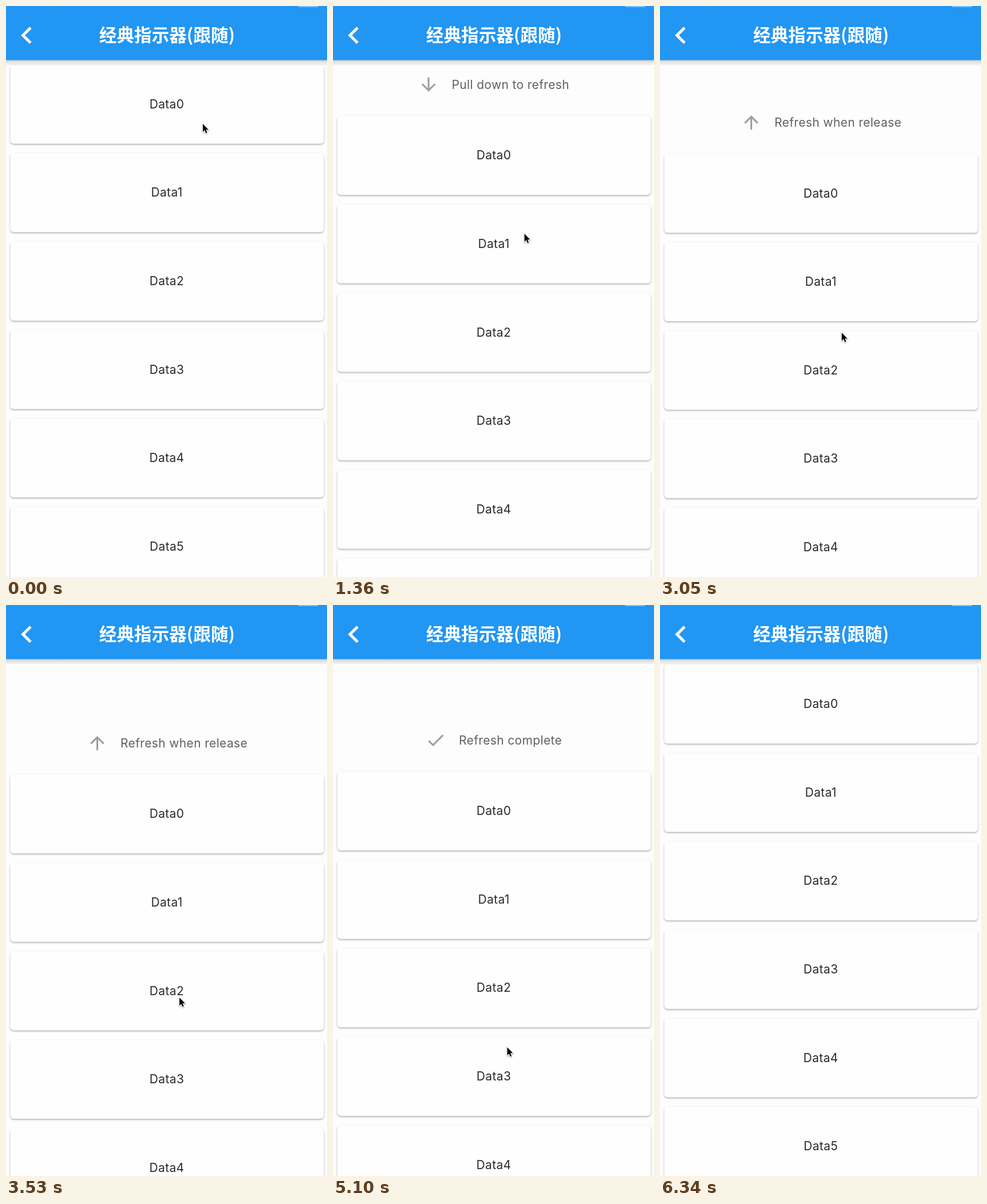
Recreate the animation shown at these times as an HTML page with a canvas. Size 561x998 px, loop 6.44 s.

```html
<!DOCTYPE html>
<html lang="zh">
<head>
<meta charset="utf-8">
<title>Pull to refresh</title>
<style>
  html, body { margin: 0; width: 100%; height: 100%; overflow: hidden; background: #fdfdfd; }
  canvas { display: block; width: 561px; height: 998px; }
</style>
</head>
<body>
<canvas id="stage" width="561" height="998"></canvas>
<script>
const ctx = document.getElementById('stage').getContext('2d');
const W = 561, H = 998, LOOP = 6440, BAR = 94;
const BLUE = '#2196f3', GRAY = '#9e9e9e';
const RELEASE_1 = 3965, SPIN_START = 4017, GRAB_2 = 4640, DONE = 4930, RELEASE_2 = 5734;
const HEADER_H = 93, TRIGGER = 150, REACH_1 = 524, REACH_2 = 206;

const icons = {
  arrow: new Path2D('M20 12l-1.41-1.41L13 16.17V4h-2v12.17l-5.58-5.59L4 12l8 8 8-8z'),
  check: new Path2D('M9 16.17L4.83 12l-1.42 1.41L9 19 21 7l-1.41-1.41z'),
  back: new Path2D('M11.67 3.87L9.9 2.1 0 12l9.9 9.9 1.77-1.77L3.54 12z'),
  pointer: new Path2D('M0 0V14L3.2 11.1 5.4 16.2 7.6 15.2 5.4 10.2H9.8z')
};

const ramp = (t, from, to) => Math.min(1, Math.max(0, (t - from) / (to - from)));
const mix = (a, b, k) => a + (b - a) * k;

// How far the list follows a finger that has moved d
const rubber = d => 480 * (1 - Math.exp(-d / 930));

// Overdamped scroll spring, from 1 to 0
function spring(ms) {
  const s = ms / 1000;
  return 1.7 * Math.exp(-9.07 * s) - 0.7 * Math.exp(-22 * s);
}

// Four strokes with short rests between them
const drag1 = t => 192 * ramp(t, 270, 1360) + 124 * ramp(t, 1600, 2280)
  + 49 * ramp(t, 2520, 3050) + 159 * ramp(t, 3140, 3680);

const drag2 = t => REACH_2 * ramp(t, GRAB_2, 5100) + 60 * ramp(t, 5100, 5700);

function offsetAt(t) {
  if (t < RELEASE_1) return rubber(drag1(t));
  if (t < GRAB_2) return mix(HEADER_H, rubber(REACH_1), spring(t - RELEASE_1));
  const pulled = HEADER_H + rubber(drag2(t));
  return t < RELEASE_2 ? pulled : pulled * spring(t - RELEASE_2);
}

function pointerAt(t) {
  if (t < GRAB_2) {
    const d = drag1(t), back = ramp(t, 4230, 4600);
    const x = 344 - 47 * (d / REACH_1) ** 1.6;
    return [mix(x, 329, back), mix(206 + d, 567, back)];
  }
  const d = drag2(t);
  return [329 - 24.5 * d / REACH_2, 567 + d];
}

let armedAt = 0;
while (offsetAt(armedAt) < TRIGGER) armedAt += 10;
armedAt = Math.min(armedAt, 2840);

// Cubic curve (0.4, 0, 0.2, 1)
function fastOutSlowIn(x) {
  if (x <= 0) return 0;
  if (x >= 1) return 1;
  let lo = 0, hi = 1;
  for (let i = 0; i < 20; i++) {
    const m = (lo + hi) / 2, n = 1 - m;
    if (1.2 * n * n * m + 0.6 * n * m * m + m * m * m < x) lo = m; else hi = m;
  }
  return lo * lo * (3 - 2 * lo);
}

function icon(path, x, y, scale, color, turn = 0, bold = 0) {
  ctx.save();
  ctx.translate(x, y);
  ctx.rotate(turn);
  ctx.scale(scale, scale);
  ctx.translate(-12, -12);
  ctx.fillStyle = ctx.strokeStyle = color;
  ctx.fill(path);
  if (bold) {
    ctx.lineWidth = bold;
    ctx.stroke(path);
  }
  ctx.restore();
}

function label(str, x, y, color, align) {
  ctx.font = '400 21px Inter, Roboto, sans-serif';
  ctx.letterSpacing = '0.35px';
  ctx.textAlign = align;
  ctx.fillStyle = color;
  ctx.fillText(str, x, y);
}

function spinner(x, y, t) {
  const cycles = Math.max(0, t - SPIN_START) / 1000;
  const step = Math.floor(cycles), u = cycles - step;
  const head = fastOutSlowIn(u * 2), tail = fastOutSlowIn(u * 2 - 1);
  const start = Math.PI * (-0.5 + 1.5 * tail + 1.7 * u - 0.8 * step);
  ctx.strokeStyle = BLUE;
  ctx.lineWidth = 3;
  ctx.beginPath();
  ctx.arc(x, y, 19, start, start + Math.max(0.01, 1.5 * Math.PI * (head - tail)));
  ctx.stroke();
}

function header(t, off) {
  const y = off + 47.8;
  const caption = (str, x) => label(str, x, y + 7.5, '#606060', 'left');
  if (t < armedAt) {
    icon(icons.arrow, 167, y, 1.55, GRAY);
    caption('Pull down to refresh', 207.5);
  } else if (t < RELEASE_1) {
    icon(icons.arrow, 159.5, y, 1.55, GRAY, Math.PI * ramp(t, armedAt, armedAt + 200));
    caption('Refresh when release', 200);
  } else if (t < DONE) {
    spinner(206, y + 0.5, t);
    caption('Refreshing...', 246.5);
  } else {
    icon(icons.check, 179.5, y, 1.54, GRAY);
    caption('Refresh complete', 220);
  }
}

function card(i, off) {
  const top = 102.5 + off + i * 154.6;
  if (top > H) return;
  ctx.save();
  ctx.shadowColor = 'rgba(0,0,0,0.32)';
  ctx.shadowBlur = 3;
  ctx.shadowOffsetY = 1.5;
  ctx.fillStyle = '#fefefe';
  ctx.beginPath();
  ctx.roundRect(7.5, top, 548, 138.2, 6);
  ctx.fill();
  ctx.restore();
  label('Data' + i, 281, top + 76.3, '#2a2a2a', 'center');
}

function appBar() {
  const shade = ctx.createLinearGradient(0, BAR, 0, BAR + 10);
  shade.addColorStop(0, 'rgba(0,0,0,0.26)');
  shade.addColorStop(0.3, 'rgba(0,0,0,0.12)');
  shade.addColorStop(1, 'rgba(0,0,0,0.025)');
  ctx.fillStyle = shade;
  ctx.fillRect(0, BAR, W, 10);
  ctx.fillStyle = BLUE;
  ctx.fillRect(0, 0, W, BAR + 0.5);
  ctx.fillStyle = 'rgba(255,255,255,0.4)';
  ctx.beginPath();
  ctx.roundRect(510, -6, 36, 8, 2);
  ctx.fill();
  ctx.fillRect(81, 0, 2, 0.6);
  icon(icons.back, 44.2, 51.3, 1.42, '#fff', 0, 1);
  ctx.font = '600 30.6px "Noto Sans CJK SC", "Noto Sans CJK", sans-serif';
  ctx.letterSpacing = '0px';
  ctx.textAlign = 'center';
  ctx.fillStyle = '#fff';
  ctx.fillText('经典指示器(跟随)', 281.5, 62.3);
}

function pointer(t) {
  if (t >= RELEASE_2) return;
  ctx.save();
  ctx.translate(...pointerAt(t));
  ctx.shadowColor = 'rgba(0,0,0,0.4)';
  ctx.shadowBlur = 2;
  ctx.shadowOffsetY = 1;
  ctx.strokeStyle = '#fff';
  ctx.lineWidth = 2;
  ctx.stroke(icons.pointer);
  ctx.shadowColor = 'transparent';
  ctx.fillStyle = '#000';
  ctx.fill(icons.pointer);
  ctx.restore();
}

function draw(t) {
  const off = offsetAt(t);
  ctx.fillStyle = '#fdfdfd';
  ctx.fillRect(0, 0, W, H);
  if (off > 0) header(t, off);
  for (let i = 0; i < 6; i++) card(i, off);
  appBar();
  pointer(t);
}

const began = performance.now();
function loop() {
  draw((performance.now() - began) % LOOP);
  requestAnimationFrame(loop);
}
loop();
</script>
</body>
</html>
```
